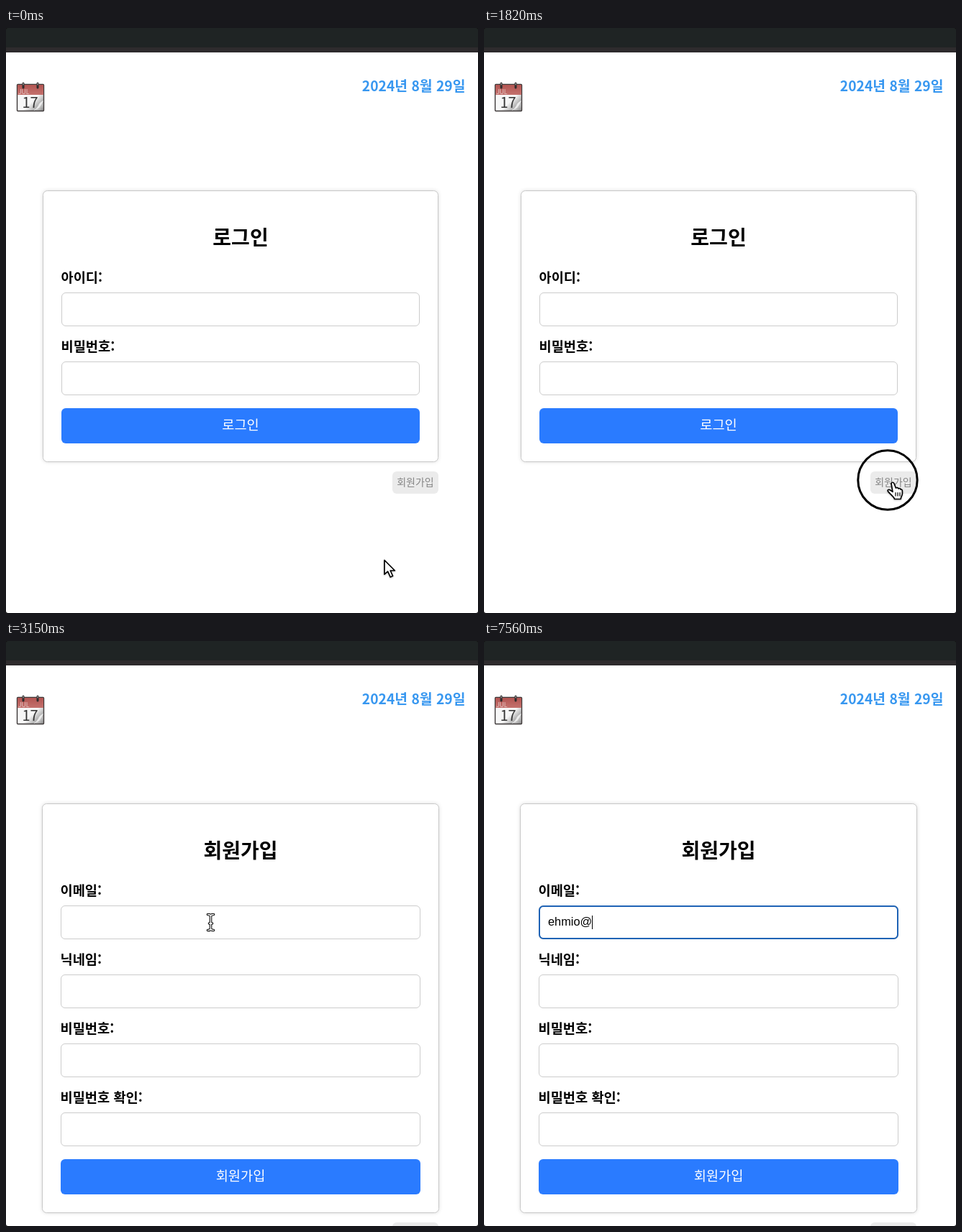
Animation of 656x814 px, one loop 8 s. Source, as an HTML page:

```html
<!DOCTYPE html>
<html lang="ko">
<head>
<meta charset="utf-8">
<title>회원가입</title>
<style>
  html, body { margin: 0; width: 100%; height: 100%; overflow: hidden; background: #fff; }
  svg { display: block; width: 656px; height: 814px; }
  text { font-family: "Noto Sans CJK KR", "Noto Sans CJK", "Noto Sans", sans-serif; }
  .title { font-size: 28px; font-weight: 700; text-anchor: middle; }
  .label { font-size: 18.67px; font-weight: 700; }
  .date { font-size: 19.3px; font-weight: 700; fill: #3797f0; text-anchor: end; }
  .action { font-size: 18.67px; font-weight: 500; fill: #fff; text-anchor: middle; }
  .small { font-size: 14px; font-weight: 500; fill: #858585; text-anchor: middle; }
  .typed { font: 16.33px "Liberation Sans", Arial, sans-serif; }
  .card { fill: #fff; stroke: #c8c8c8; filter: drop-shadow(0 0 2.5px rgba(0, 0, 0, .14)); }
  .field { fill: #fff; stroke: #ccc; }
  .focus { fill: #fff; stroke: #1f63b5; stroke-width: 2; }
  .button { fill: #2a7bff; }
  .ghost { fill: #ebebeb; }
  .pointer { fill: #fff; stroke: #000; stroke-width: 1.7; stroke-linejoin: round; stroke-linecap: round;
    filter: drop-shadow(0 1px 1px rgba(0, 0, 0, .25)); }
  #ring { fill: none; stroke: #000; stroke-width: 3; }
</style>
</head>
<body>
<svg viewBox="0 0 656 814">
  <defs>
    <linearGradient id="paper" x1="0" y1="0" x2="1" y2="1">
      <stop offset=".6" stop-color="#f7f7f7"/>
      <stop offset=".78" stop-color="#b5b5b5"/>
      <stop offset=".86" stop-color="#f0f0f0"/>
      <stop offset="1" stop-color="#8a8a8a"/>
    </linearGradient>
    <linearGradient id="header" x1="0" y1="0" x2="0" y2="1">
      <stop offset="0" stop-color="#b25552"/>
      <stop offset="1" stop-color="#c4716d"/>
    </linearGradient>
  </defs>

  <rect width="656" height="814" fill="#fff"/>
  <rect width="656" height="34" fill="#2e2b2d"/>
  <rect width="656" height="27" fill="#1f2424"/>

  <g id="calendar">
    <rect x="15.5" y="78.5" width="37" height="37" rx="1" fill="url(#paper)" stroke="#3d3838" stroke-width="1.4"/>
    <rect x="16" y="79" width="36" height="14" fill="url(#header)"/>
    <path d="M24 77v6M44 77v6" stroke="#2f2b2b" stroke-width="3" stroke-linecap="round"/>
    <path d="M24 77v2M44 77v2" stroke="#bbb" stroke-linecap="round"/>
    <text x="17" y="92" font-size="8.5" fill="#e8cfcd">JUL</text>
    <text x="33.5" y="111" font-size="20" font-weight="500" fill="#333" text-anchor="middle">17</text>
    <path d="M52 101L38 115H52Z" fill="#777" opacity=".4"/>
    <path d="M52 101Q46 104 45 108Q43 112 38 115Q48 113 52 101Z" fill="#ececec"/>
  </g>
  <text class="date" x="638.5" y="88">2024년 8월 29일</text>

  <g id="login">
    <rect class="card" x="51.5" y="226.5" width="549" height="377" rx="6"/>
    <text class="title" x="326" y="302">로그인</text>
    <text class="label" x="76.5" y="354">아이디:</text>
    <rect class="field" x="77.5" y="368.5" width="497" height="46" rx="5.5"/>
    <text class="label" x="76.5" y="450">비밀번호:</text>
    <rect class="field" x="77.5" y="464.5" width="497" height="46" rx="5.5"/>
    <rect class="button" x="77" y="529" width="498" height="49" rx="6"/>
    <text class="action" x="326" y="559">로그인</text>
    <rect class="ghost" x="537" y="617" width="64" height="31" rx="6"/>
    <text class="small" x="569" y="636.5">회원가입</text>
  </g>

  <g id="signup">
    <rect class="card" x="50.5" y="226.5" width="551" height="569" rx="6"/>
    <text class="title" x="326" y="302">회원가입</text>
    <text class="label" x="75.5" y="354">이메일:</text>
    <rect class="field" x="76.5" y="368.5" width="499" height="46" rx="5.5"/>
    <text class="label" x="75.5" y="450">닉네임:</text>
    <rect class="field" x="76.5" y="464.5" width="499" height="46" rx="5.5"/>
    <text class="label" x="75.5" y="546">비밀번호:</text>
    <rect class="field" x="76.5" y="560.5" width="499" height="46" rx="5.5"/>
    <text class="label" x="75.5" y="642">비밀번호 확인:</text>
    <rect class="field" x="76.5" y="656.5" width="499" height="46" rx="5.5"/>
    <rect class="button" x="76" y="721" width="500" height="49" rx="6"/>
    <text class="action" x="326" y="751">회원가입</text>
    <rect class="ghost" x="537" y="809" width="64" height="31" rx="6"/>
    <g id="active">
      <rect class="focus" x="77" y="369" width="498" height="45" rx="5.5"/>
      <text id="typed" class="typed" x="89" y="396"></text>
      <rect id="caret" y="382" width="1" height="19"/>
    </g>
  </g>

  <path d="M0 811V814H3Q0 814 0 811ZM656 811V814H653Q656 814 656 811ZM0 3V0H3Q0 0 0 3ZM656 3V0H653Q656 0 656 3Z" fill="#111"/>

  <circle id="ring"/>
  <g id="cursor">
    <path id="arrow" class="pointer" d="M1 1.5V21.2L5.6 17.2L9.2 25L12.6 23.5L9.2 16H15.4Z"/>
    <g id="hand" class="pointer" stroke-width="1.4">
      <path d="M4 3C4.5 .8 7 .6 8 3L10.4 9C12 8 13.6 8.6 14 10C15.4 9 17 9.8 17.2 11.2C18.6 10.6 19.4 12 19.4 13.6V17C19.2 20 17.4 21 17.2 24.5H8.6C7.6 21 4 19.4 -.6 13.6C-1.6 11.6 .8 10.6 2.6 12L6 14.4Z"/>
      <path d="M10 15.5V20M13 15.5V20M16 15.5V20" fill="none" stroke-width="1.2"/>
    </g>
    <g id="beam" fill="none" stroke-linecap="round">
      <path d="M-4-11Q0-11 0-8.5Q0-11 4-11M0-8.5V8.5M-4 11Q0 11 0 8.5Q0 11 4 11M-2 1.5H2" stroke="#000" stroke-width="3.6"/>
      <path d="M-4-11Q0-11 0-8.5Q0-11 4-11M0-8.5V8.5M-4 11Q0 11 0 8.5Q0 11 4 11M-2 1.5H2" stroke="#fff" stroke-width="1.5"/>
    </g>
  </g>
</svg>

<script>
  const LOOP = 8000, TICK = 70;
  const $ = id => document.getElementById(id);
  const show = (id, on) => { $(id).style.display = on ? '' : 'none'; };
  const within = (t, [from, to]) => t >= from && t < to;

  // start, end, then the point reached
  const moves = [
    [0, 630, 567, 632],
    [1190, 1400, 562, 631],
    [1960, 2730, 285, 390],
    [2730, 2800, 284.5, 391.5],
    [3500, 3570, 283.5, 400]
  ];
  // start, end, then centre and radius
  const clicks = [
    [910, 1050, 566, 631, 28.5],
    [1820, 1960, 561, 629, 41.2],
    [3220, 3290, 284, 391, 35]
  ];
  const word = 'ehmio@';
  const keys = [4620, 4830, 5250, 5460, 5600, 7560];
  const blinks = [[3780, 4270], [6160, 6650], [7210, 7560]];
  const fieldTops = [368, 464, 560, 656];

  const ease = p => p * p * (3 - 2 * p);

  function position(t) {
    let x = 525, y = 739;
    for (const [from, to, toX, toY] of moves) {
      if (t < from) break;
      const p = ease(Math.min(1, (t - from) / (to - from)));
      x += (toX - x) * p;
      y += (toY - y) * p;
    }
    return [x, y];
  }

  function shape(t, y) {
    if (within(t, [1260, 1960])) return 'hand';
    const inField = t >= 1960 && fieldTops.some(top => y >= top && y < top + 47);
    return inField ? 'beam' : 'arrow';
  }

  function draw(now) {
    const t = Math.floor((now % LOOP) / TICK) * TICK;

    show('login', t < 1960);
    show('signup', t >= 1960);
    show('active', t >= 3220);

    const typed = $('typed');
    typed.textContent = word.slice(0, keys.filter(k => t >= k).length);
    const width = typed.textContent && t >= 3220 ? typed.getComputedTextLength() : 0;
    $('caret').setAttribute('x', Math.floor(89 + width));
    show('caret', !blinks.some(b => within(t, b)));

    const [x, y] = position(t);
    const kind = shape(t, y);
    $('cursor').setAttribute('transform', `translate(${x} ${y})`);
    for (const id of ['arrow', 'hand', 'beam']) show(id, id === kind);
    show('cursor', t < 4690);

    const click = clicks.find(c => within(t, c));
    show('ring', click);
    if (click) ['cx', 'cy', 'r'].forEach((name, i) => $('ring').setAttribute(name, click[i + 2]));

    requestAnimationFrame(draw);
  }
  draw(performance.now());
</script>
</body>
</html>
```
